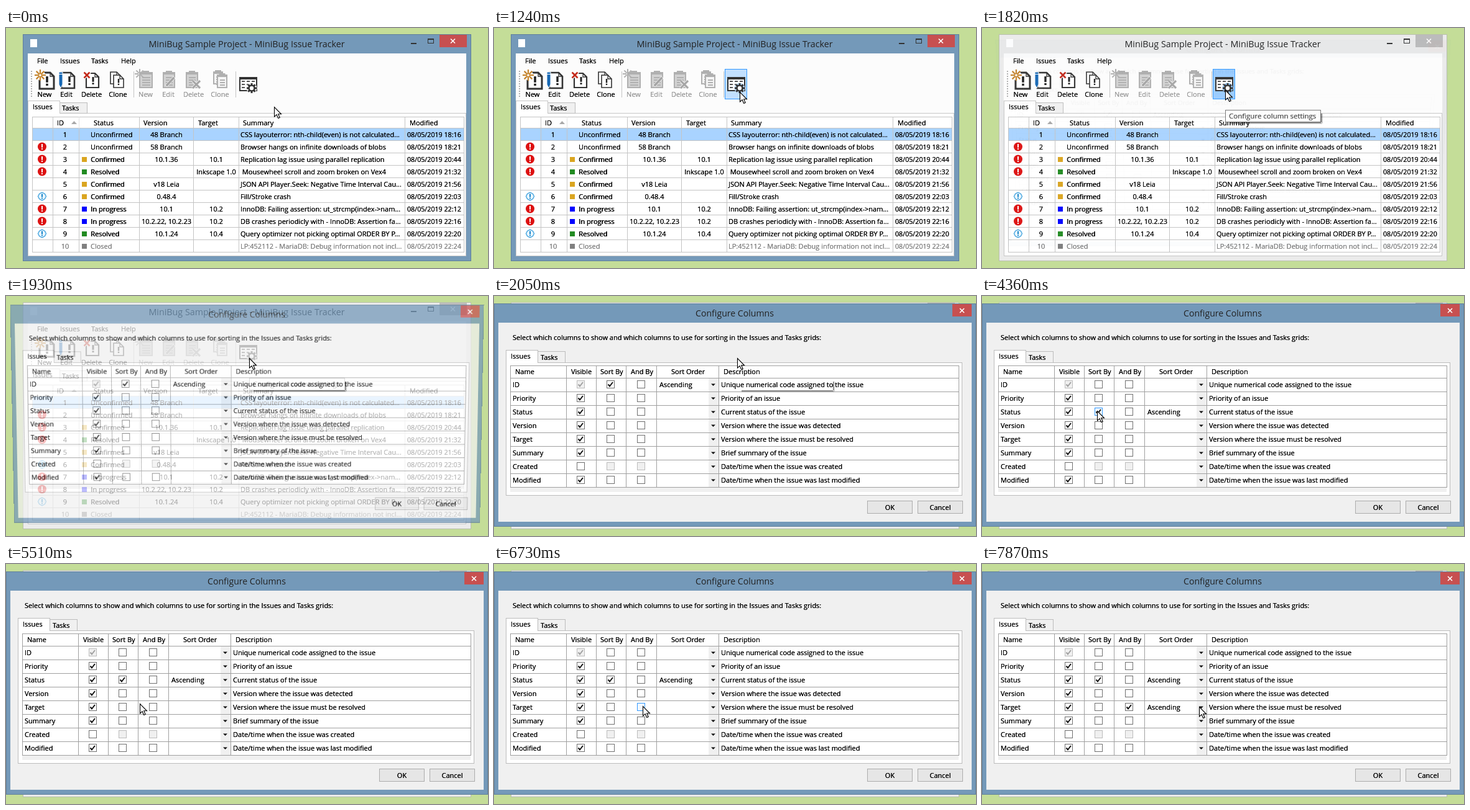
These frames come from a looping animation (775 px wide and 387 px high, 8 s). An HTML page with a canvas:

```html
<!DOCTYPE html>
<html lang="en">
<head>
<meta charset="utf-8">
<title>Issue tracker: column settings</title>
<style>
html, body { margin: 0; width: 100%; height: 100%; overflow: hidden; background: #c4dd98; }
canvas { display: block; }
</style>
</head>
<body>
<canvas id="stage" width="775" height="387"></canvas>
<script>
const W = 775, H = 387, LOOP = 8000;
const BLUE = '#7499b9', INK = '#000';
const stage = document.getElementById('stage').getContext('2d');
const sheet = document.createElement('canvas');
sheet.width = W;
sheet.height = H;
const sheetCtx = sheet.getContext('2d');
let g = stage;

// drawing helpers
function box(x, y, w, h, fill, stroke) {
  if (fill) { g.fillStyle = fill; g.fillRect(x, y, w, h); }
  if (stroke) { g.strokeStyle = stroke; g.lineWidth = 1; g.strokeRect(x + .5, y + .5, w - 1, h - 1); }
}
// Small text is laid down twice to look as dense as hinted type.
function text(s, x, y, { color = INK, size = 11, align = 'left', bold = false } = {}) {
  g.font = size + 'px "Open Sans", "Noto Sans", sans-serif';
  g.textAlign = align;
  g.fillStyle = color;
  g.fillText(s, x, y);
  if (size < 13) g.fillText(s, x + (bold ? .6 : 0), y);
}
function path(points, { fill, stroke, width = 1, close = false }) {
  g.beginPath();
  for (let i = 0; i < points.length; i += 2) g.lineTo(points[i], points[i + 1]);
  if (close || fill) g.closePath();
  if (fill) { g.fillStyle = fill; g.fill(); }
  if (stroke) { g.strokeStyle = stroke; g.lineWidth = width; g.stroke(); }
}
function disc(x, y, r, fill, stroke, width = 1) {
  g.beginPath();
  g.arc(x, y, r, 0, 7);
  if (fill) { g.fillStyle = fill; g.fill(); }
  if (stroke) { g.strokeStyle = stroke; g.lineWidth = width; g.stroke(); }
}
function cross(x, y, r, color, width) {
  path([x - r, y - r, x + r, y + r], { stroke: color, width });
  path([x + r, y - r, x - r, y + r], { stroke: color, width });
}
function rays(x, y, inner, outer, color, width) {
  for (let i = 0; i < 8; i++) {
    const c = Math.cos(i * Math.PI / 4), s = Math.sin(i * Math.PI / 4);
    path([x + c * inner, y + s * inner, x + c * outer, y + s * outer], { stroke: color, width });
  }
}
function bang(x, y, h, color, w = 3) {
  box(x - w / 2, y, w, h * .65, color);
  box(x - w / 2, y + h * .78, w, h * .22, color);
}
function page(x, y, w, h, width) {
  path([x, y, x + w - 6, y, x + w, y + 6, x + w, y + h, x, y + h],
    { fill: '#fff', stroke: '#333', width, close: true });
  path([x + w - 6, y, x + w - 6, y + 6, x + w, y + 6], { stroke: '#333', width: 1.3 });
}
function clipboard(x, y, w, h, body = '#d2d2d2') {
  const c = '#b0b0b0';
  box(x, y, w, h, c);
  box(x + 2, y + 4, w - 4, h - 6, body);
  box(x + w / 2 - 5, y - 2, 10, 6, c);
  for (let i = 0; i < 4; i++) box(x + 5, y + 8 + i * 4, w - 9, 2, c);
}

function toolbar(button) {
  for (let y = 69; y < 113; y += 4) box(40, y, 2, 2, '#b0b0b0');
  page(54, 72, 23, 26, 3);
  bang(66, 78, 15, '#222', 3.6);
  disc(55, 76, 8, '#fcfcfc');
  rays(55, 76, 3, 9, '#c5852f', 2.2);
  disc(55, 76, 2.5, '#fff', '#c5852f', 1.3);

  page(89, 72, 21, 25, 2.6);
  bang(102, 78, 14, '#222', 3.4);
  path([85, 71, 91, 71, 91, 91, 88, 97, 85, 91], { fill: '#1768b4', stroke: '#fff' });
  box(85, 74, 6, 1, '#fff');

  page(129, 73, 20, 23, 2.2);
  bang(140, 79, 12, '#222');
  cross(130, 76, 5, '#fff', 5);
  cross(130, 76, 4.5, '#c32b1c', 2.6);

  page(168, 71, 16, 19, 1.6);
  page(173, 76, 16, 20, 1.6);
  bang(181, 82, 10, '#222', 2.4);

  clipboard(214, 71, 22, 26);
  rays(215, 74, 2, 8, '#b0b0b0', 2);
  clipboard(252, 71, 20, 26);
  path([256, 92, 269, 78, 272, 81, 259, 95], { fill: '#a5a5a5', stroke: '#eee' });
  clipboard(289, 71, 20, 26);
  cross(306, 91, 6, '#eee', 5);
  cross(306, 91, 6, '#a5a5a5', 3);
  clipboard(333, 70, 16, 21, '#f4f4f4');
  clipboard(339, 75, 17, 22, '#f4f4f4');
  box(205, 70, 1, 42, '#c4c4c4');
  box(369, 70, 1, 42, '#c4c4c4');

  [['New', 62], ['Edit', 97], ['Delete', 137.5], ['Clone', 180]].forEach(([s, x]) => {
    text(s, x, 111, { align: 'center' });
  });
  [['New', 224.5], ['Edit', 261], ['Delete', 301.5], ['Clone', 344]].forEach(([s, x]) => {
    text(s, x, 111, { align: 'center', color: '#999' });
  });

  const face = ['#fcfcfc', '#c2e0ff', '#99ccff'][button];
  if (button) box(371, 66, 36, 49, face, '#3399ff');
  box(375, 79, 29, 23, '#333');
  box(377, 83, 25, 17, '#fff');
  for (let i = 0; i < 3; i++) {
    for (let j = 0; j < 3; j++) box(379 + i * 8, 85 + j * 5, 5, 2, '#555');
  }
  disc(395, 97, 8.5, face);
  rays(395, 97, 4, 8, '#333', 3);
  disc(395, 97, 4.5, '#fff', '#333', 2.6);
}

const issues = [
  ['', 'Unconfirmed', '48 Branch', '', 'CSS layouterror: nth-child(even) is not calculated...', '18:16'],
  ['!', 'Unconfirmed', '58 Branch', '', 'Browser hangs on infinite downloads of blobs', '18:21'],
  ['!', 'Confirmed', '10.1.36', '10.1', 'Replication lag issue using parallel replication', '20:44'],
  ['!', 'Resolved', '', 'Inkscape 1.0', ' Mousewheel scroll and zoom broken on Vex4', '21:32'],
  ['', 'Confirmed', 'v18 Leia', '', 'JSON API Player.Seek: Negative Time Interval Cau...', '21:56'],
  ['i', 'Confirmed', '0.48.4', '', 'Fill/Stroke crash', '22:03'],
  ['!', 'In progress', '10.1', '10.2', 'InnoDB: Failing assertion: ut_strcmp(index->nam...', '22:12'],
  ['!', 'In progress', '10.2.22, 10.2.23', '10.2', 'DB crashes periodicly with - InnoDB: Assertion fa...', '22:16'],
  ['i', 'Resolved', '10.1.24', '10.4', 'Query optimizer not picking optimal ORDER BY P...', '22:20'],
  ['', 'Closed', '', '', 'LP:452112 - MariaDB: Debug information not incl...', '22:24']
];
const statusColor = { Confirmed: '#daa520', Resolved: '#228b22', 'In progress': '#0000ff', Closed: '#808080' };

function issueRow([priority, status, version, target, summary, time], i) {
  const y = 162 + i * 20, mid = y + 10, base = y + 14;
  const color = i === 9 ? '#808080' : INK;
  if (i === 0) box(43, y, 693, 19, '#a9d3ff');
  if (priority === '!') {
    disc(58, mid - .5, 7, '#dd1111');
    bang(58, mid - 5, 9, '#fff', 2);
  } else if (priority) {
    path([58, mid - 7, 62.5, mid - 4.5, 64.5, mid - .5, 62.5, mid + 3.5,
      58, mid + 6, 53.5, mid + 3.5, 51.5, mid - .5, 53.5, mid - 4.5],
      { fill: '#e8f6ff', stroke: '#3a9fdc', width: 1.3 });
    bang(58, mid - 4.5, 8, '#1684c8', 2);
  }
  const c = { color, align: 'center' };
  text(i + 1, 95, base, c);
  if (statusColor[status]) box(122, mid - 4, 8, 8, statusColor[status]);
  text(status, 136, base, { color, bold: i > 1 && i < 9 });
  text(version, 258, base, c);
  text(target, 338, base, c);
  text(summary, 377, base, { color });
  text('08/05/2019 ' + time, 645, base, { color, size: 10.7 });
}

function mainWindow(active, button) {
  box(27, 10, 721, 366, active ? BLUE : '#ebebeb', active ? '#5f7f9b' : '#b9bfae');
  box(39, 18, 11, 13, '#fff');
  text('MiniBug Sample Project - MiniBug Issue Tracker', 387, 31, { size: 14.3, align: 'center', color: '#222' });
  box(651, 24, 9, 2, '#333');
  box(678, 17, 10, 8, null, '#333');
  box(678, 17, 10, 2, '#333');
  box(697, 11, 44, 20, active ? '#c75050' : '#bcbcbc');
  cross(718.5, 21, 3.5, '#fff', 1.6);

  box(35, 41, 705, 327, '#fcfcfc');
  [['File', 50], ['Issues', 87], ['Tasks', 137], ['Help', 185]].forEach(([s, x]) => text(s, x, 57));
  toolbar(button);

  box(35, 137, 705, 231, '#fff', '#c6c6c6');
  box(86, 120, 45, 18, '#f0f0f0', '#bcbcbc');
  box(35, 117, 52, 21, '#fff', '#c6c6c6');
  box(36, 136, 50, 3, '#fff');
  text('Issues', 43, 131);
  text('Tasks', 90, 133);

  box(42, 143, 694, 219, '#fff');
  issues.forEach(issueRow);
  for (let i = 0; i < 12; i++) box(42, i ? 141 + i * 20 : 143, 695, 1, '#c4c4c4');
  [42, 75, 117, 214, 301, 374, 641, 736].forEach((x, i) => {
    if (i === 2) box(x, 143, 1, 19, '#e2e2e2');
    box(x, i === 2 ? 162 : 143, 1, i === 2 ? 200 : 219, '#c4c4c4');
  });
  [['ID', 82], ['Status', 141], ['Version', 221], ['Target', 309], ['Summary', 381], ['Modified', 649]]
    .forEach(([s, x]) => text(s, x, 157));
  path([105, 155, 109.5, 150, 114, 155], { fill: '#a8a8a8' });
}

function checkbox(x, y, on, { disabled, hover } = {}) {
  const edge = disabled ? '#bcbcbc' : hover ? '#3399ff' : '#707070';
  box(x - 6, y - 7, 13, 13, disabled ? '#f0f0f0' : hover ? '#f3f9ff' : '#fff', edge);
  if (on) path([x - 3.5, y - .5, x - 1, y + 2.5, x + 4, y - 4],
    { stroke: disabled ? '#a0a0a0' : '#111', width: 2 });
}
function pushButton(label, x, w) {
  box(x, 330, w, 21, '#e6e6e6', '#acacac');
  text(label, x + w / 2, 345, { align: 'center' });
}

const columns = [
  ['ID', 'Unique numerical code assigned to the issue'],
  ['Priority', 'Priority of an issue'],
  ['Status', 'Current status of the issue'],
  ['Version', 'Version where the issue was detected'],
  ['Target', 'Version where the issue must be resolved'],
  ['Summary', 'Brief summary of the issue'],
  ['Created', 'Date/time when the issue was created'],
  ['Modified', 'Date/time when the issue was last modified']
];

function dialog(t, [cx, cy]) {
  const sortBy = t < 4360 ? 0 : 2;
  const andBy = t < 6970 ? -1 : 4;
  box(0, 12, W, 360, BLUE, '#5f7f9b');
  text('Configure Columns', 387, 33, { size: 14.1, align: 'center', color: '#222' });
  box(737, 13, 31, 20, '#c75050');
  cross(752.5, 23.5, 3.5, '#fff', 1.6);
  box(7, 43, 761, 321, '#f0f0f0');
  text('Select which columns to show and which columns to use for sorting in the Issues and Tasks grids:', 30, 71);

  box(19, 107, 734, 215, '#fff', '#bcbcbc');
  box(70, 89, 45, 19, '#f0f0f0', '#bcbcbc');
  box(19, 87, 52, 21, '#fff', '#bcbcbc');
  box(20, 106, 50, 3, '#fff');
  text('Issues', 27, 101);
  text('Tasks', 75, 103);

  box(26, 308, 721, 8, '#f0f0f0');
  columns.forEach(([name, about], i) => {
    const y = 143 + i * 22, off = name === 'Created';
    const hover = x => Math.abs(cx - x) < 7 && Math.abs(cy - y) < 7;
    text(name, 30, y + 4);
    checkbox(139, y, !off, { disabled: i === 0 });
    checkbox(187, y, i === sortBy, { disabled: off, hover: hover(187) });
    checkbox(236, y, i === andBy, { disabled: off, hover: hover(236) });
    box(345, y - 10, 16, 21, '#f0f0f0');
    path([349, y - 1.5, 356, y - 1.5, 352.5, y + 2], { fill: '#111' });
    if (i === sortBy || i === andBy) text('Ascending', 266, y + 4);
    text(about, 365, y + 4);
  });
  box(26, 112, 722, 1, '#a0a0a0');
  for (let i = 0; i < 9; i++) box(26, 132 + i * 22, 722, 1, '#a0a0a0');
  [26, 116, 164, 212, 261, 361, 747].forEach(x => box(x, 112, 1, 197, '#a0a0a0'));
  [['Name', 34], ['Visible', 124], ['Sort By', 171], ['And By', 220], ['Sort Order', 285], ['Description', 369]]
    .forEach(([s, x]) => text(s, x, 126));
  pushButton('OK', 600, 73);
  pushButton('Cancel', 681, 73);
}

// Tilted sheet: narrower towards the bottom, one line at a time.
function tilted(tilt, alpha) {
  const top = 12 + 4.5 * tilt, squeeze = 1 - .05 * tilt;
  g.globalAlpha = alpha;
  for (let y = Math.round(top); y < top + 360 * squeeze; y++) {
    const d = Math.min(359, Math.max(0, (y - top) / squeeze));
    const s = 1 - tilt * (.035 + .035 * d / 360);
    g.drawImage(sheet, 0, 12 + d, W, 1, 389 - 389 * s, y, W * s, 1);
  }
  g.globalAlpha = 1;
}

function tooltip(alpha) {
  g.globalAlpha = alpha;
  box(391, 132, 154, 20, '#fff', '#767676');
  text('Configure column settings', 397, 146, { size: 11.5, color: '#575757' });
  g.globalAlpha = 1;
}
function tooltipShadow(alpha) {
  for (let i = 0; i < 3; i++) {
    const c = `rgba(0,0,0,${alpha * (.5 - i * .17)})`;
    box(398, 152 + i, 147 + i, 1, c);
    box(545 + i, 138, 1, 14 + i, c);
  }
}

// start, steps, step length, end x, end y
const moves = [
  [620, 13, 57, 391, 100],
  [2400, 13, 60, 191, 185],
  [3430, 2, 60, 186, 184],
  [3740, 1, 60, 185, 185],
  [4850, 13, 60, 217, 227],
  [5690, 5, 60, 225, 227],
  [6110, 4, 60, 246, 229],
  [6670, 2, 60, 239, 229],
  [7270, 11, 60, 349, 230]
];
function pointer(t) {
  let x = 431, y = 127;
  for (const [start, steps, dt, ex, ey] of moves) {
    if (t < start) break;
    const k = Math.min(1, (Math.floor((t - start) / dt) + 1) / steps);
    const e = (k + k * k * (3 - 2 * k)) / 2;
    x += (ex - x) * e;
    y += (ey - y) * e;
  }
  return [Math.round(x), Math.round(y)];
}
function arrow([x, y]) {
  g.save();
  g.translate(x + .5, y + .5);
  path([0, 0, 0, 15.5, 3.6, 12.2, 6.2, 18, 8.7, 17, 6.2, 11.3, 11, 11.3],
    { fill: '#fff', stroke: '#000', width: 1.1, close: true });
  g.restore();
}

// time, tilt, opacity of the opening dialog
const opening = [[1820, 1.55, .03], [1870, .95, .42], [1930, .48, .74], [1990, .2, .92], [2050, 0, 1]];

function draw(t) {
  const at = pointer(t);
  const step = opening.filter(o => t >= o[0]).pop();
  g = stage;
  box(0, 0, W, H, '#c4dd98');
  const over = at[0] < 407 && t < 1870;
  mainWindow(t < 1820, over ? (t < 1720 ? 1 : 2) : 0);
  const tip = t < 1420 ? 0 : t < 1480 ? .35 : t < 1540 ? .7 : 1;
  if (tip && t < 2050) tooltip(tip);
  if (step) {
    if (step[1]) {
      g = sheetCtx;
      dialog(t, at);
      g = stage;
      tilted(step[1], step[2]);
    } else dialog(t, at);
  }
  if (tip && t < 2110) tooltipShadow(tip);
  arrow(at);
}

let begin;
function tick(now) {
  begin ??= now;
  draw((now - begin) % LOOP);
  requestAnimationFrame(tick);
}
draw(0);
requestAnimationFrame(tick);
</script>
</body>
</html>
```
